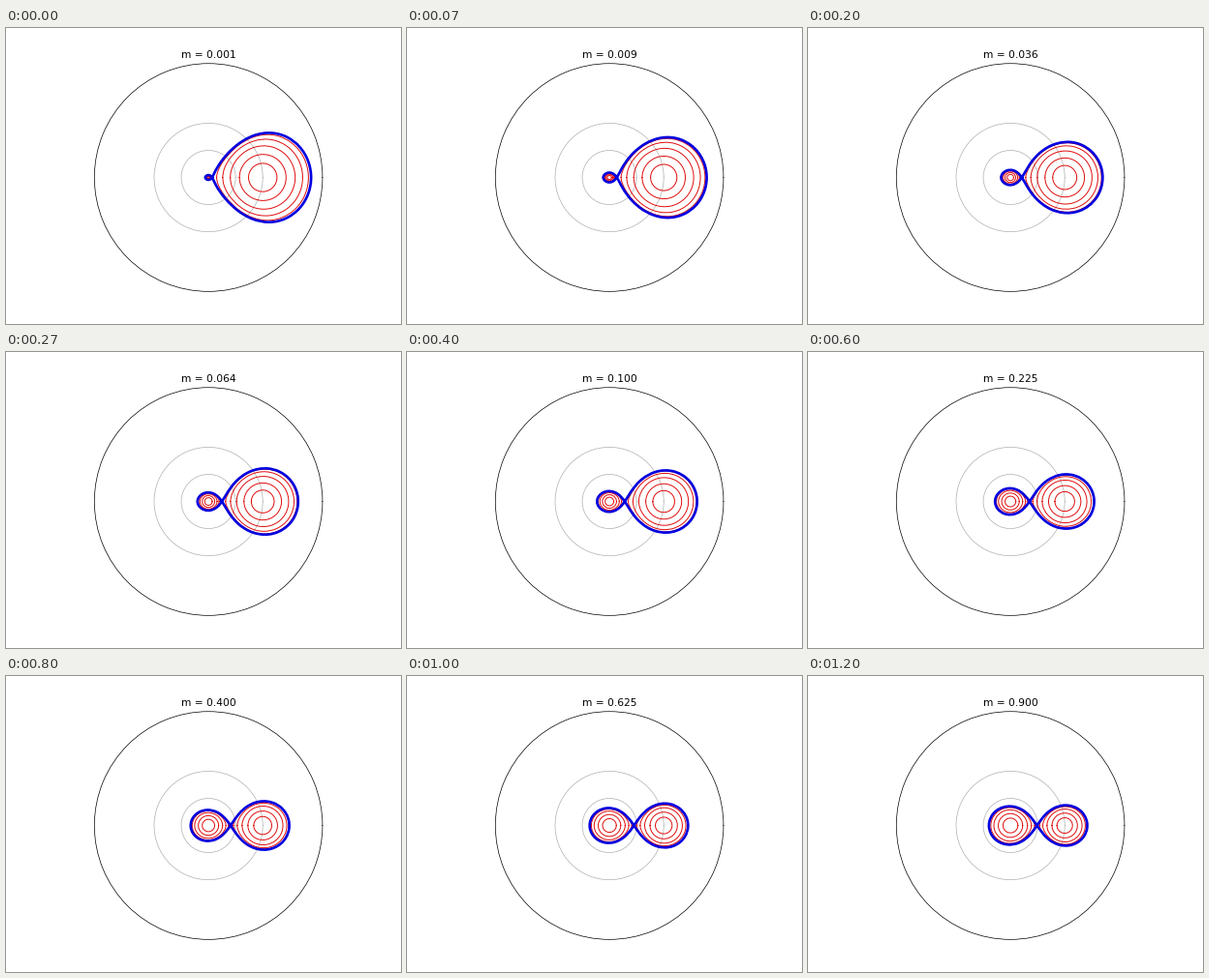
Write a matplotlib script that moves like this. It is 408 px wide and 306 px high and loops after 1.27 s.

```python
import numpy as np
import matplotlib.pyplot as plt
from matplotlib.animation import FuncAnimation

FRAMES = 19
LOOP_MS = 1270
RING_FRACTIONS = (0.28, 0.46, 0.64, 0.79, 0.91)
ANGLES = np.linspace(0, 2 * np.pi, 721)


def potential(x, y, m, saddle=0.0):
    """Co-rotating two-body potential, body m at 0 and body 1 at x = 1."""
    gravity = m / np.hypot(x, y) + 1 / np.hypot(x - 1, y)
    # The sideways spin term fades near the saddle point.
    fade = 1 - np.exp(-((x - saddle) ** 2 + y ** 2) / 0.72)
    spin = (x - 1 / (1 + m)) ** 2 + fade * y ** 2
    return gravity + (1 + m) / 2 * spin


def saddle_point(m):
    x = np.linspace(0.01, 0.9, 30000)
    return x[np.argmin(potential(x, 0 * x, m))]


def lobe_curves(center, m, saddle):
    """Closed level curves around one body; the last one is the lobe."""
    reach = abs(saddle - center)
    side = np.sign(saddle - center)
    s = reach * np.linspace(0.02, 1, 1200)
    dx, dy = side * np.cos(ANGLES), np.sin(ANGLES)
    x = center + np.outer(dx, s)
    y = np.outer(dy, s)
    phi = potential(x, y, m, saddle)
    curves = []
    for f in RING_FRACTIONS + (1,):
        level = potential(center + side * f * reach, 0.0, m, saddle)
        below = phi < level
        first = np.where(below.any(axis=1), below.argmax(axis=1), len(s) - 1)
        r = s[first]
        curves.append((center + r * dx, r * dy))
    return curves


def join_polar(curves):
    """Chain curves with gaps and turn them into angle and radius."""
    x = np.concatenate([np.append(c[0], np.nan) for c in curves])
    y = np.concatenate([np.append(c[1], np.nan) for c in curves])
    return np.arctan2(y, x), np.hypot(x, y)


fig = plt.figure(figsize=(6.4, 4.8), dpi=63.75, facecolor="white")
ax = fig.add_subplot(projection="polar")
ax.set_ylim(0, 2.1)
ax.set_yticks([0.5, 1.0], ["", ""])
ax.set_xticks([])
ax.grid(True, color="#b0b0b0", lw=0.8)
title = ax.set_title("", y=1.0, fontname="DejaVu Sans", fontsize=12)
rings, = ax.plot([], [], color="#e00c0c", lw=1.1, zorder=3)
lobes, = ax.plot([], [], color="#0000e0", lw=3, zorder=4,
                 solid_capstyle="round")
ax.set_ylim(0, 2.1)


def draw(n):
    # The mass grows with the square of a 25 fps step, shown at 15 fps.
    step = 1 + int((n + 0.5) / 0.6)
    m = 0.001 * step ** 2
    saddle = saddle_point(m)
    near = lobe_curves(0, m, saddle)
    far = lobe_curves(1, m, saddle)
    rings.set_data(*join_polar(near[:-1] + far[:-1]))
    lobes.set_data(*join_polar([near[-1], far[-1]]))
    title.set_text(f"m = {m:.3f}")
    return rings, lobes, title


anim = FuncAnimation(fig, draw, frames=FRAMES, interval=LOOP_MS / FRAMES,
                     repeat=True, repeat_delay=0)
plt.show()
```
